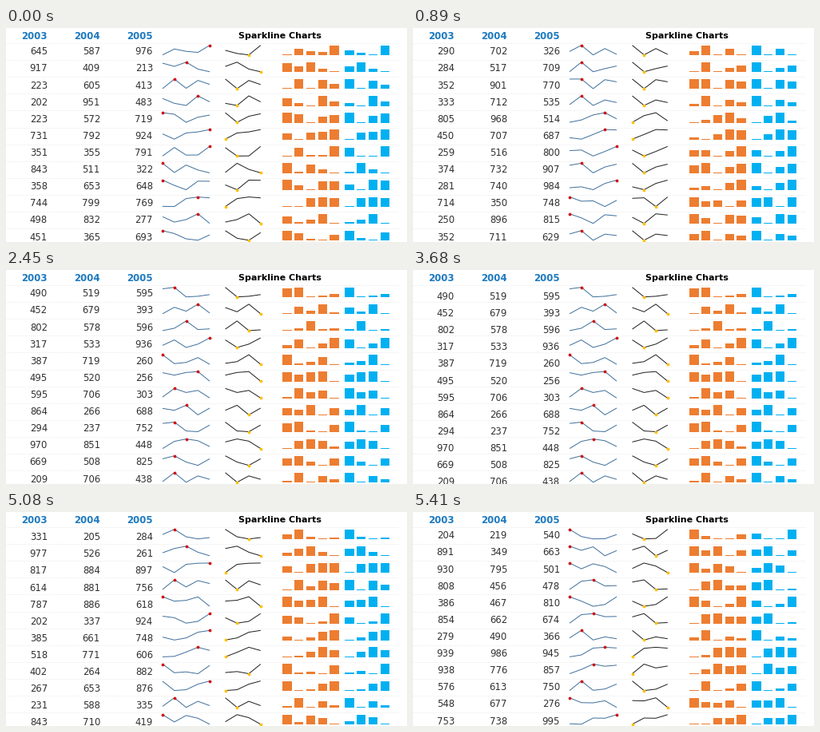
Recreate the animation shown at these times as a matplotlib script. Size 502 by 268 pixels, loop 5940 ms.

```python
import matplotlib.pyplot as plt
import numpy as np
from matplotlib.animation import FuncAnimation
from matplotlib.collections import LineCollection, PolyCollection
from matplotlib.transforms import Bbox, TransformedBbox

W, H, DPI = 502, 268, 64
STEP, LOOP = 30, 5940
CLOCK_OFFSET = 20                      # aligns the frame clock with the rolls
ROWS, PITCH, TOP, GAP = 12, 21.1, 18, 14.75
COLUMNS = (51.9, 117.9, 183.9)
ROLL_MS = 330
# (start, time already elapsed when first seen), in ms
ROLLS = ((560, 5), (2120, 3), (3680, 30), (5080, 5))

# A sheet of random figures is recalculated at each roll. Every row holds
# five years, of which the last three are printed.
SHEETS = np.random.default_rng(2005).integers(200, 1000,
                                              (len(ROLLS) + 1, ROWS, 5))


def px(size):
    return size * 72 / DPI


fig = plt.figure(figsize=(W / DPI, H / DPI), dpi=DPI, facecolor="white")
ax = fig.add_axes([0, 0, 1, 1])
ax.set(xlim=(0, W), ylim=(H, 0))
ax.axis("off")

for i in range(ROWS):
    y = round(TOP + i * PITCH) + 0.5
    ax.plot([0, 492], [y, y], color="#dcdcdc", lw=px(0.8), ls=(0, (1, 2)))
for y0, y1 in ((113, 121), (165, 182)):
    ax.plot([501.5, 501.5], [y0, y1], color="#d0d0d0", lw=px(1))

for x, year in zip(COLUMNS, ("2003", "2004", "2005")):
    ax.text(x, 13.5, year, ha="right", color="#1e7abf", weight="bold",
            family="DejaVu Sans", size=px(11.7))
ax.text(342.7, 13, "Sparkline Charts", ha="center", color="black",
        weight="bold", family="DejaVu Sans", size=px(11.1))


def number_cells():
    cells = []
    for i in range(ROWS):
        top = TOP + i * PITCH
        clip = TransformedBbox(Bbox([[0, top], [195, top + PITCH]]),
                               ax.transData)
        for x in COLUMNS:
            cell = ax.text(x, 0, "", ha="right", color="#303030",
                           family="DejaVu Sans", size=px(11.6), clip_on=True)
            cell.set_clip_box(clip)
            cells.append(cell)
    return cells


def set_numbers(cells, values, shift):
    for k, (cell, value) in enumerate(zip(cells, values[:, 2:].flat)):
        cell.set_text(str(value))
        cell.set_y(33.4 + k // 3 * PITCH + shift)


def levels(values):
    low = values.min(axis=1, keepdims=True)
    return (values - low) / (values.max(axis=1, keepdims=True) - low)


class LineCharts:
    def __init__(self, x, first, color, dot_color, pick):
        self.x, self.first, self.pick = x, first, pick
        self.lines = ax.add_collection(
            LineCollection([], colors=color, linewidths=px(1)))
        self.dots = ax.scatter([], [], s=px(3.8) ** 2, color=dot_color,
                               linewidths=0, zorder=4)

    def show(self, values):
        level = levels(values[:, self.first:])
        xs = np.tile(self.x + GAP * np.arange(level.shape[1]), (ROWS, 1))
        ys = 33.7 - 12 * level + PITCH * np.arange(ROWS)[:, None]
        points = np.dstack([xs, ys])
        self.lines.set_segments(points)
        best = self.pick(level, axis=1)
        self.dots.set_offsets(points[np.arange(ROWS), best])


class BarCharts:
    def __init__(self, x, first, color):
        self.x, self.first = x, first
        self.bars = ax.add_collection(
            PolyCollection([], facecolors=color, linewidths=0))

    def show(self, values):
        boxes = []
        for i, row in enumerate(levels(values[:, self.first:])):
            base = 34.2 + i * PITCH
            for k, level in enumerate(row):
                x0 = self.x + GAP * k
                x1, y = x0 + 11.2, base - 1 - 11.6 * level
                boxes.append([(x0, base), (x0, y), (x1, y), (x1, base)])
        self.bars.set_verts(boxes)


current, incoming = number_cells(), number_cells()
charts = [
    LineCharts(196, 0, "#41719c", "#d01010", np.argmax),
    LineCharts(274.5, 1, "#202020", "#ffc000", np.argmin),
    BarCharts(346.3, 0, "#ed7d31"),
    BarCharts(424.3, 1, "#00b0f0"),
]


def draw(frame):
    t = frame * STEP + CLOCK_OFFSET
    state, progress = 0, 0
    for start, lead in ROLLS:
        if t >= start:
            progress = (t - start + lead) / ROLL_MS
            if progress >= 1:
                state, progress = state + 1, 0

    # Numbers roll down and settle; the charts jump once they have landed.
    eased = 1 - (1 - progress) ** 2
    set_numbers(current, SHEETS[state], eased * PITCH)
    for cell in incoming:
        cell.set_visible(progress > 0)
    if progress:
        set_numbers(incoming, SHEETS[state + 1], (eased - 1) * PITCH)
    for chart in charts:
        chart.show(SHEETS[state])
    return []


anim = FuncAnimation(fig, draw, frames=LOOP // STEP, interval=STEP,
                     repeat=True, repeat_delay=0, blit=False)
plt.show()
```
